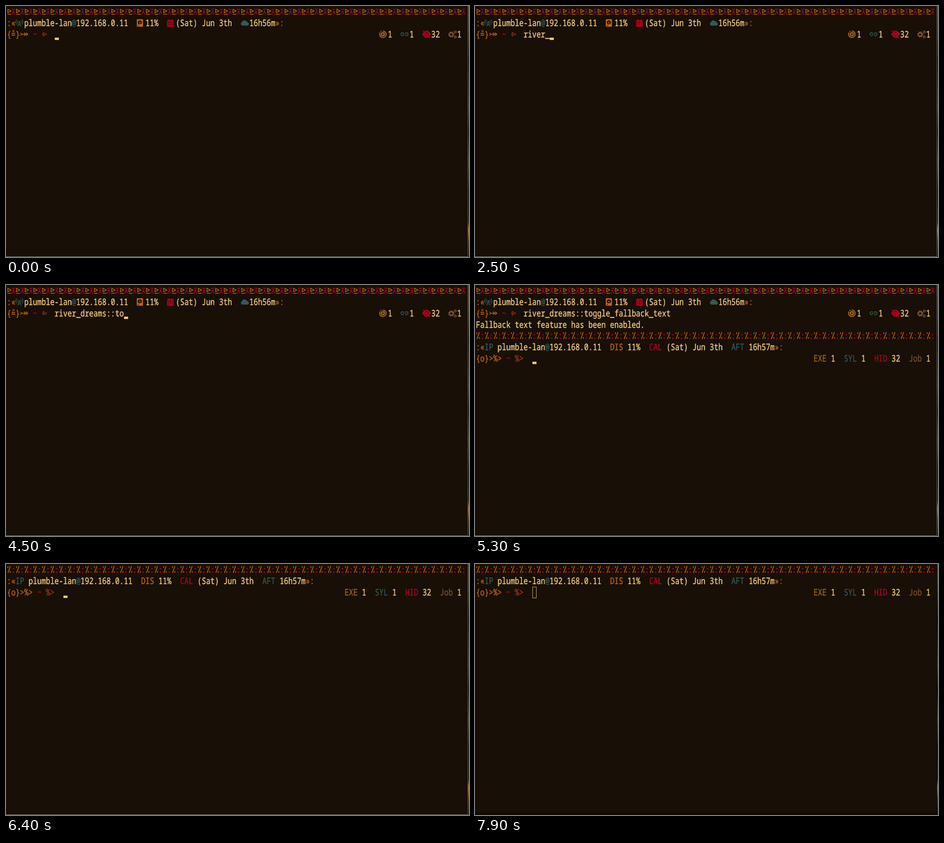
An HTML page for the animation above (8.1 s loop, 1016 by 551 pixels).

```html
<!DOCTYPE html>
<html lang="en">
<head>
<meta charset="utf-8">
<title>Terminal prompt</title>
<style>
  html, body { margin: 0; width: 100%; height: 100%; overflow: hidden; background: #180f06; }
  svg { display: block; }
  text {
    font: 19.79px "Noto Sans Mono", "DejaVu Sans Mono", monospace;
    font-variant-ligatures: none;
    text-rendering: geometricPrecision;
    white-space: pre;
    stroke-width: .4px;
  }
</style>
</head>
<body>
<svg id="stage" width="1016" height="551" viewBox="0 0 1016 551"></svg>
<script>
const LOOP = 8100, CELL = 9.5, ROW = 24.75, LEFT = 2;
const C = {
  bg: '#180f06', text: '#f7cf82', orange: '#c4650f', red: '#b8001f', teal: '#315b57',
  gold: '#a0661a', brown: '#7a5233', rust: '#a3381a'
};
const USER = 'plumble-lan', HOST = '192.168.0.11';
const COMMAND = 'river_dreams::toggle_fallback_text ';

const colX = col => LEFT + col * CELL;

// One run of text on the terminal grid, in a condensed face.
const run = (col, row, str, color, id = '') =>
  `<text ${id && `id="${id}"`} fill="${color}" stroke="${color}" transform="translate(${colX(col)} ${19.5 + row * ROW}) scale(.8 1)">${str}</text>`;
const runs = (row, list) => list.map(([col, str, color = C.text]) => run(col, row, str, color)).join('');

const line = (d, color, width = 1.5) =>
  `<path d="${d}" fill="none" stroke="${color}" stroke-width="${width}"/>`;
const fill = (d, color) => `<path d="${d}" fill="${color}"/>`;
const ring = (x, y, r, color, width = 1.5) =>
  `<circle cx="${x}" cy="${y}" r="${r}" fill="none" stroke="${color}" stroke-width="${width}"/>`;
const disc = (x, y, r, color) => `<circle cx="${x}" cy="${y}" r="${r}" fill="${color}"/>`;
const box = (x, y, w, h, color, more = '') =>
  `<rect x="${x}" y="${y}" width="${w}" height="${h}" fill="${color}" ${more}/>`;

// A row of 53 ornaments, each two cells wide.
const border = motif => Array.from({ length: 53 }, (_, i) =>
  `<g transform="translate(${LEFT + i * CELL * 2} 0)">${motif}</g>`).join('');

const wedges = border(
  line('M2 7.2L9 11L2 14.8Z', C.orange, 1.5) + line('M1.3 18.2H9.5', C.orange, 1.5) +
  line('M10.8 7.2H18', C.red, 1.5) + line('M11.5 18.8L14.4 10.5L17.3 18.8', C.red, 1.5));

const slashes = border(
  line('M2.4 19.5L7.6 4.5', C.orange, 1.7) +
  line('M2.2 5V8.6M7.6 15.4V19', C.orange, 1.8) +
  disc(14.2, 10, 1.5, C.red) + disc(14.2, 18, 1.5, C.red));

const antenna =
  line('M25.5 45L29.3 35L33.1 45M27 41.5H31.6', C.teal, 1.4) + disc(29.3, 35, 1.6, C.teal) +
  line('M26 38.2Q24.4 35 26 31.8M32.6 38.2Q34.2 35 32.6 31.8', C.teal, 1.3) +
  line('M23.4 41Q19.8 35 23.4 29.2M35.2 41Q38.8 35 35.2 29.2', C.teal, 1.4);

const disk =
  box(287, 29, 13.5, 16.5, C.orange, 'rx="1.5"') + disc(293.7, 36, 4.6, C.bg) +
  disc(293.7, 36, 1.5, C.orange) + fill('M293 37L298.5 42.5L296 44.5Z', C.orange) +
  line('M289.3 43H292', C.bg, 1.3);

const calendarHoles = Array.from({ length: 6 }, (_, i) =>
  box(356 + i % 3 * 4, 36.5 + (i > 2) * 4, 2, 2, C.bg)).join('');
const calendar = box(353.5, 31, 14.5, 14.5, C.red, 'rx="1.5"') +
  box(356.5, 29, 2, 3, C.red) + box(363, 29, 2, 3, C.red) +
  box(353.5, 34, 14.5, .8, C.bg) + calendarHoles;

const cloud = fill('M518.5 43A4 4 0 0 1 517.8 35.4A5.6 5.6 0 0 1 527.5 33.5A4 4 0 0 1 530.8 36.4A3.4 3.4 0 0 1 530 43Z', C.teal);

const ornaments =
  ring(16.3, 55, 1.7, C.orange, 1.1) +
  line('M31.5 59L35 62L31.5 65M35 62H47.5M39.5 58.5L43.5 62L39.5 65.5M44 58.5L48 62L44 65.5', C.orange, 1.4) +
  line('M81.5 58L89.5 62L81.5 66ZM79 62H85', C.rust, 1.2);

const play =
  line('M821 58A7.2 7.2 0 1 0 827 54.8', C.gold, 2.2) + line('M821.5 56.5L824.5 54.8', C.gold, 1.8) +
  disc(827, 62, 4.8, C.gold) + fill('M825.6 59.6L829.6 62L825.6 64.4Z', C.bg);

const link =
  line('M873 58.8H870A3.2 3.2 0 0 0 870 65.2H873M876 58.8H879A3.2 3.2 0 0 1 879 65.2H876M871 62H878', C.teal, 1.7);

const eye =
  fill('M913.5 62Q923 46 932.5 62Q923 78 913.5 62Z', C.red) + ring(923, 62, 4.4, C.bg, 1) +
  line('M917.3 53.5L931.3 69.5', C.bg, 1) + line('M915.5 54L930.5 70.5', C.red, 2);

const gear = (x, y, r) => ring(x, y, r, C.brown, r * .7) +
  `<circle cx="${x}" cy="${y}" r="${r * 1.45}" fill="none" stroke="${C.brown}" stroke-width="${r * .5}" stroke-dasharray="${r * .57}"/>`;
const gears = gear(977, 62.5, 4) + gear(985.8, 57, 2) + gear(985.8, 68, 2);

const iconPrompt = wedges +
  runs(1, [
    [0, ':«', C.orange], [4, USER], [15, '@', C.teal], [16, HOST], [32, '11%'],
    [39, '(Sat) Jun 3th'], [56, '16h56m'], [62, '»:', C.orange]
  ]) + antenna + disk + calendar + cloud +
  runs(2, [
    [0, '{=}', C.orange], [6, '~', C.red],
    [88, '1'], [93, '1'], [98, '32'], [104, '1']
  ]) + ornaments + play + link + eye + gears;

const textPrompt = slashes +
  runs(1, [
    [0, ':«', C.orange], [2, 'IP', C.teal], [5, USER], [16, '@', C.teal], [17, HOST],
    [31, 'DIS', C.orange], [35, '11%'], [40, 'CAL', C.red], [44, '(Sat) Jun 3th'],
    [59, 'AFT', C.teal], [63, '16h57m'], [69, '»:', C.orange]
  ]) +
  runs(2, [
    [0, '{o}>%>', C.orange], [7, '~', C.red], [9, '%>', C.rust],
    [78, 'EXE', C.gold], [82, '1'], [85, 'SYL', C.teal], [89, '1'],
    [92, 'HID', C.red], [96, '32'], [100, 'Job', C.brown], [104, '1']
  ]);

// Sliver of wallpaper beside the window.
const wallpaper = `<linearGradient id="wall" x2="0" y2="1">` +
  [[0, '#4c4a38'], [.1, '#3a3d2a'], [.22, '#14160f'], [.4, '#3b4030'], [.5, '#12140d'],
   [.62, '#45462f'], [.74, '#15160d'], [.86, '#2a2414'], [.89, '#a8763a'], [.94, '#4d3217'], [1, '#17120b']]
    .map(([at, c]) => `<stop offset="${at}" stop-color="${c}"/>`).join('') + `</linearGradient>`;

document.getElementById('stage').innerHTML =
  `<defs>${wallpaper}</defs>` + box(0, 0, 1016, 551, C.bg) + box(1014, 0, 2, 551, 'url(#wall)') +
  `<g id="focusEdge">${box(1013, 0, 1, 551, '#5a5a50')}${box(0, 550, 1014, 1, '#8f8e88')}</g>` +
  `<g id="blurEdge">${box(0, 546, 1014, 5, '#100a04')}${box(1012, 0, 2, 551, '#100a04')}</g>` +
  `<g id="first">${iconPrompt}${run(11, 2, '', C.text, 'typed')}</g>` +
  `<g id="output">${run(0, 3, 'Fallback text feature has been enabled.', C.text)}</g>` +
  `<g id="second">${textPrompt}</g>` +
  box(0, 0, 9, 5, C.text, 'id="cursor"') +
  box(126.5, 50.5, 8, 24, 'none', `id="hollow" stroke="${C.text}" stroke-opacity=".85"`);

const el = id => document.getElementById(id);
const [first, typed, output, second, cursor, hollow, focusEdge, blurEdge] =
  ['first', 'typed', 'output', 'second', 'cursor', 'hollow', 'focusEdge', 'blurEdge'].map(el);
const show = (node, on) => node.setAttribute('visibility', on ? 'visible' : 'hidden');

const KEYS = [1200, 1500, 1800, 2000, 2200, 2500, 2700, 2900, 3000, 3200, 3500, 3700, 3900, 4100, 4300, 4500];
const COMPLETE = 4600, ENTER = 4900, PRINT = 5100, PROMPT = 5300, CLEAR = 6400, BLUR = 7900;
const FADES = [[100, 1200], [5500, CLEAR], [6700, BLUR]];

// Within a fade the cursor dims and comes back in quarter steps.
function blink(t) {
  const fade = FADES.find(([start, end]) => t >= start && t < end);
  if (!fade) return 1;
  const p = Math.floor((t - fade[0]) / 100);
  if (p < 5) return Math.max(0, .75 - p / 4);
  return Math.min(1, Math.round(1 + (p - 5) * .6) / 4);
}

function cursorCell(t, count) {
  if (t < ENTER) return [11 + count, 2];
  if (t < PRINT) return [0, 3];
  if (t < PROMPT) return [0, 4];
  return [13, t < CLEAR ? 6 : 2];
}

function draw(t) {
  const count = t >= COMPLETE ? COMMAND.length : KEYS.filter(k => t >= k).length;
  typed.textContent = COMMAND.slice(0, count);
  show(first, t < CLEAR);
  show(output, t >= PRINT && t < CLEAR);
  show(second, t >= PROMPT);
  second.setAttribute('transform', `translate(0 ${t < CLEAR ? 4 * ROW : 0})`);

  const [col, row] = cursorCell(t, count);
  cursor.setAttribute('x', Math.round(colX(col)));
  cursor.setAttribute('y', Math.round(.5 + (row + 1) * ROW) - 5.5);
  cursor.setAttribute('opacity', blink(t));

  const blurred = t >= BLUR;
  show(cursor, !blurred);
  show(hollow, blurred);
  show(focusEdge, !blurred);
  show(blurEdge, blurred);
}

function tick() {
  draw(performance.now() % LOOP);
  requestAnimationFrame(tick);
}
tick();
</script>
</body>
</html>
```
